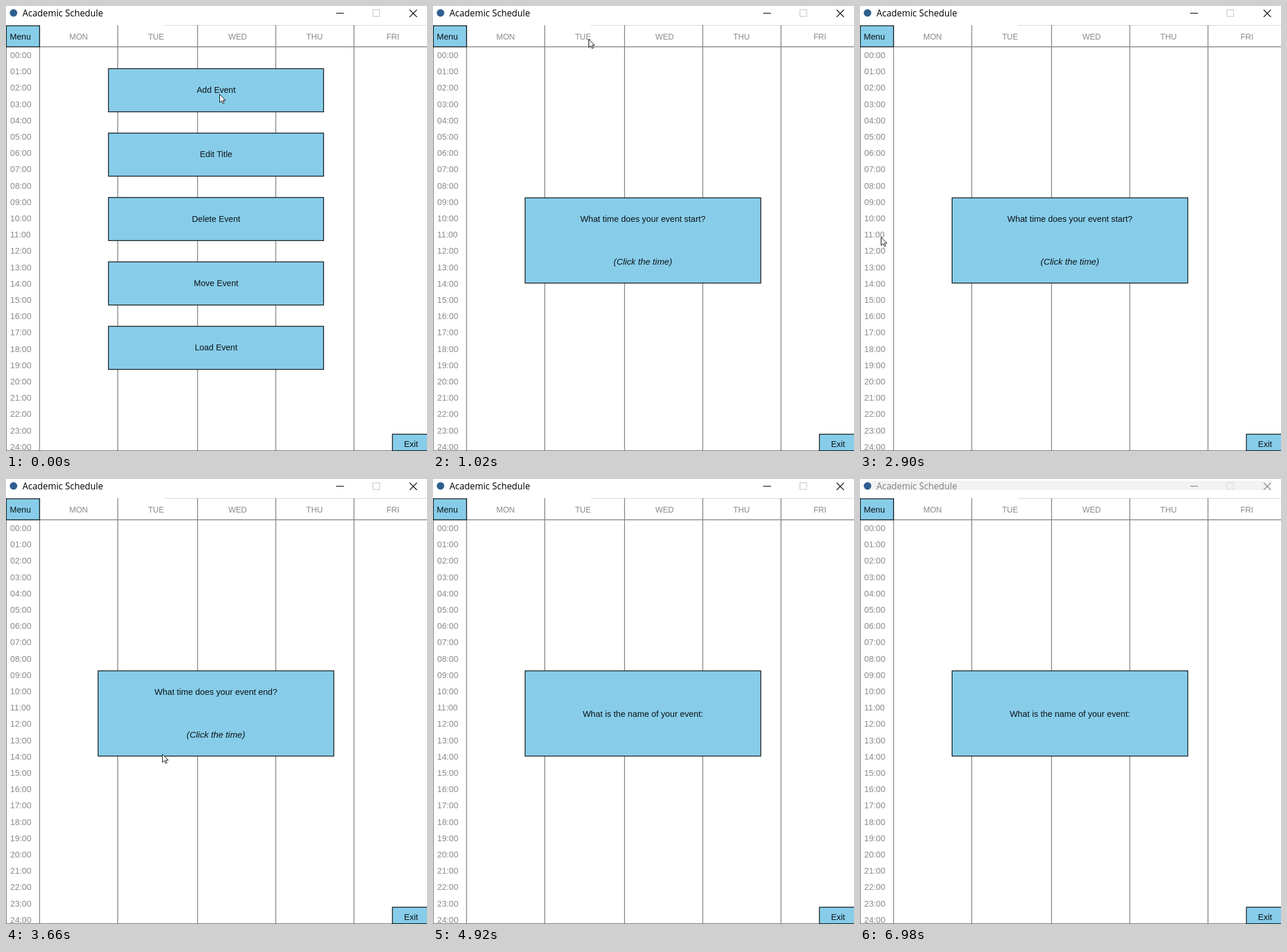
Write an HTML page that moves like this. It is 728 px wide and 769 px high and loops after 8 s.

```html
<!DOCTYPE html>
<html lang="en">
<head>
<meta charset="utf-8">
<title>Academic Schedule</title>
<style>
  html, body { margin: 0; width: 100%; height: 100%; overflow: hidden; background: #fff; }
  svg { display: block; width: 728px; height: 769px; }
  text { font: 14.6px "Liberation Sans", Arial, sans-serif; fill: #0c1216; }
  .mid { text-anchor: middle; }
  .grey { fill: #8a8a8a; }
  .day { font-size: 13.8px; }
  .ask { font-size: 14.75px; }
  .hint { font-size: 15.2px; font-style: italic; }
  .title { font: 15.5px "Open Sans", "Noto Sans", sans-serif; fill: #000; }
  .box { fill: #87cde9; stroke: #10181c; stroke-width: 1.4; }
  .rule { stroke: #808080; stroke-width: 1.4; fill: none; }

  .anim { animation: 8s step-end infinite; }
  .phase { visibility: hidden; }
  #menu { animation-name: menu; }
  #panel { animation-name: panel; }
  #day { animation-name: day; }
  #start { animation-name: start; }
  #end { animation-name: end; }
  #pick { animation-name: pick; }
  #name { animation-name: name; }
  #band { animation-name: band; opacity: 0; }
  #chrome { animation-name: chrome; }
  #cursor { animation-name: move; }

  @keyframes menu { 0% { visibility: visible } 1.5%, to { visibility: hidden } }
  @keyframes panel { 0% { visibility: hidden } 1.5%, to { visibility: visible } }
  @keyframes day { 0% { visibility: hidden } 1.5% { visibility: visible } 12.75%, to { visibility: hidden } }
  @keyframes start { 0% { visibility: hidden } 12.75% { visibility: visible } 39.625%, to { visibility: hidden } }
  @keyframes end { 0% { visibility: hidden } 39.625% { visibility: visible } 55.125%, to { visibility: hidden } }
  @keyframes pick { 0% { visibility: hidden } 12.75% { visibility: visible } 55.125%, to { visibility: hidden } }
  @keyframes name { 0% { visibility: hidden } 55.125%, to { visibility: visible } }
  @keyframes band { 0% { opacity: 0 } 85.75% { opacity: .5 } 87.25%, to { opacity: 1 } }
  @keyframes chrome { 0% { opacity: 1 } 85.75% { opacity: .72 } 87.25%, to { opacity: .48 } }
  @keyframes move {
    0% { transform: translate(369px, 152px) }
    4.625% { transform: translate(326px, 108px) }
    6.125% { transform: translate(290px, 72px) }
    8% { transform: translate(279px, 64px) }
    9.5% { transform: translate(272px, 59px) }
    11% { transform: translate(269px, 57px) }
    20.625% { transform: translate(172px, 142px) }
    22.125% { transform: translate(66px, 251px) }
    24% { transform: translate(31px, 324px) }
    25.5% { transform: translate(40px, 348px) }
    27.25% { transform: translate(44px, 362px) }
    28.75% { transform: translate(47px, 380px) }
    30.25% { transform: translate(46px, 396px) }
    31.75% { transform: translate(45px, 406px) }
    33.25% { transform: translate(43px, 411px) }
    34.75% { transform: translate(39px, 406px) }
    36.25% { transform: translate(36px, 399px) }
    42.75% { transform: translate(300px, 352px) }
    44.25% { transform: translate(637px, 337px) }
    45.75% { transform: translate(270px, 475px) }
    47.25% { transform: translate(110px, 470px) }
    48.75% { transform: translate(55px, 462px) }
    50.25% { transform: translate(36px, 456px) }
    52% { transform: translate(31px, 453px) }
    56.625% { transform: translate(32px, 454px) }
    59.75% { transform: translate(248px, 386px); visibility: visible }
    61.5%, to { transform: translate(248px, 386px); visibility: hidden }
  }
</style>
</head>
<body>
<svg viewBox="0 0 728 769">
  <rect id="band" class="anim" x="11" y="3" width="700" height="16" fill="#f2f2f2"/>
  <circle cx="13" cy="12" r="6.5" fill="#2f5f8f"/>
  <g id="chrome" class="anim" fill="none" stroke="#000" stroke-width="1.2">
    <text class="title" x="28.5" y="18" stroke="none">Academic Schedule</text>
    <path d="M571 12.5H584.5"/>
    <rect x="634.5" y="6.5" width="11.5" height="11.5" stroke="#c6c6c6"/>
    <path d="M698 6.5L710.5 19M710.5 6.5L698 19"/>
  </g>

  <path d="M273 33.5H728" stroke="#d4d4d4"/>
  <path class="rule" d="M.5 33V769M0 70.5H728M0 768.5H728M58 33V769M193.3 33V769M331.3 33V769M466.5 33V769M601.7 33V769"/>
  <g id="labels"></g>
  <rect class="box" x=".5" y="34.2" width="57.5" height="36.3"/>
  <text x="6.5" y="57.5">Menu</text>
  <rect class="box" x="668.2" y="740" width="62" height="28.5"/>
  <text class="mid" x="700.5" y="762">Exit</text>

  <g id="menu" class="anim phase"></g>
  <rect id="panel" class="anim phase box" x="159.3" y="331.5" width="407.5" height="147.3"/>
  <g class="mid">
    <g id="day" class="anim phase">
      <text class="ask" x="363" y="373">What day is your event?</text>
      <text class="hint" x="363" y="447">(Click the day)</text>
    </g>
    <text id="start" class="anim phase ask" x="363" y="373">What time does your event start?</text>
    <text id="end" class="anim phase ask" x="363" y="373">What time does your event end?</text>
    <text id="pick" class="anim phase hint" x="363" y="447">(Click the time)</text>
    <text id="name" class="anim phase ask" x="363" y="410.5">What is the name of your event:</text>
  </g>

  <g id="cursor" class="anim">
    <path d="M.5 .7V14.8L3.8 11.7L6.2 16.5L8.3 15.5L6 10.9H10.5Z" fill="#fff" stroke="#000"/>
  </g>
</svg>
<script>
  const NS = 'http://www.w3.org/2000/svg';
  const labels = document.getElementById('labels');
  const menu = document.getElementById('menu');

  function add(parent, tag, attrs, text = '') {
    const el = document.createElementNS(NS, tag);
    for (const key in attrs) el.setAttribute(key, attrs[key]);
    el.textContent = text;
    parent.append(el);
  }

  const days = { MON: 125.5, TUE: 259.5, WED: 400.5, THU: 533.5, FRI: 669 };
  for (const day in days)
    add(labels, 'text', { class: 'mid grey day', x: days[day], y: 57.5 }, day);

  for (let h = 0; h <= 24; h++)
    add(labels, 'text', { class: 'grey', x: 7.3, y: Math.round(90 + h * 28.2) },
      String(h).padStart(2, '0') + ':00');

  ['Add Event', 'Edit Title', 'Delete Event', 'Move Event', 'Load Event'].forEach((name, i) => {
    const y = 108.3 + i * 111.3;
    add(menu, 'rect', { class: 'box', x: 177.2, y, width: 372, height: 74.5 });
    add(menu, 'text', { class: 'mid', x: 363.3, y: Math.round(y + 41.7) }, name);
  });
</script>
</body>
</html>
```
